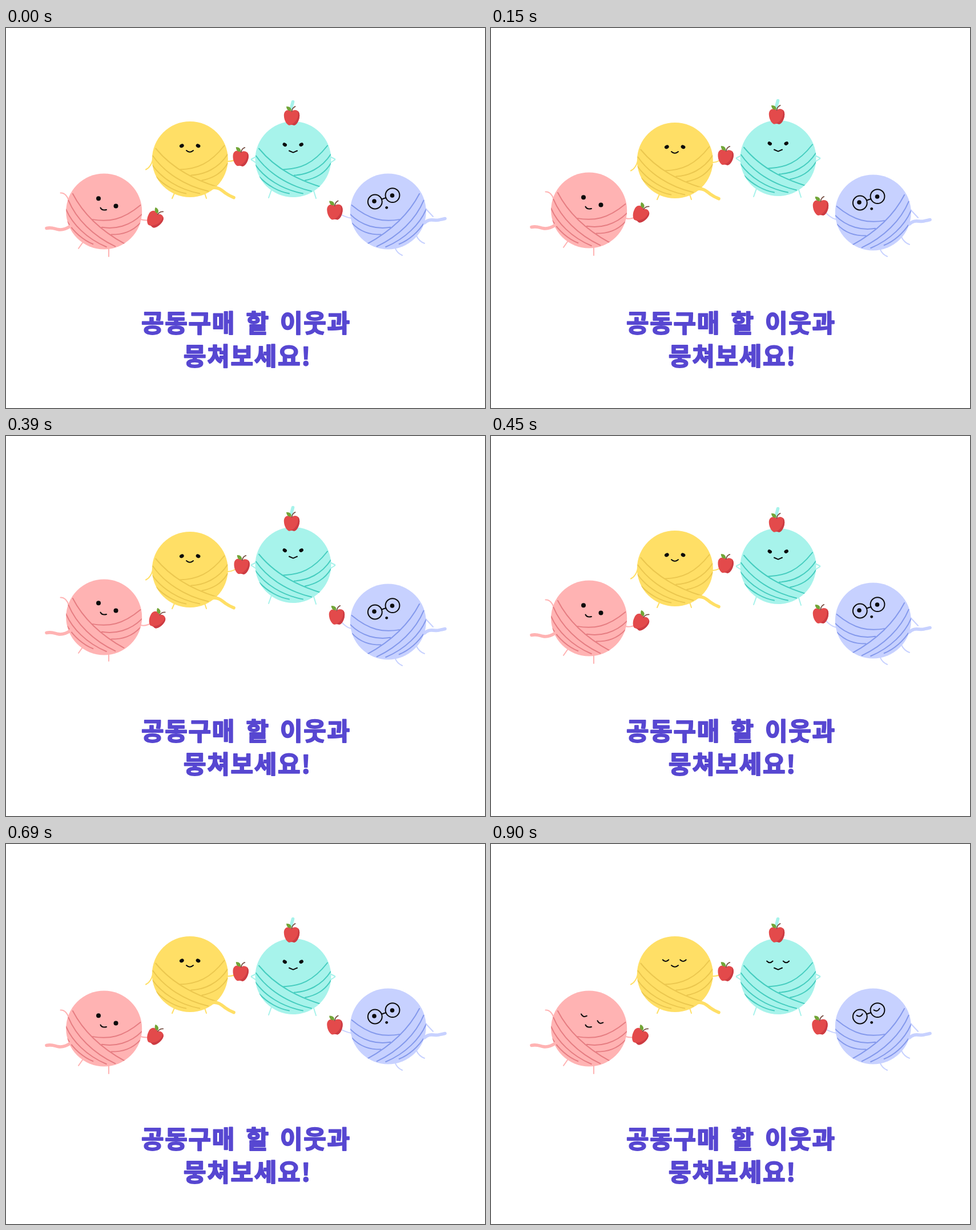
Animation of 839x667 px, one loop 1050 ms. Source, as an HTML page:

```html
<!DOCTYPE html>
<html lang="ko">
<head>
<meta charset="utf-8">
<title>공동구매</title>
<style>
  html, body { margin: 0; width: 100%; height: 100%; overflow: hidden; background: #fff; }
  svg { display: block; width: 100%; height: 100%; }
  .line { fill: none; stroke-width: 2; stroke-linecap: round; stroke-linejoin: round; }
  .tail { fill: none; stroke-width: 5.6; stroke-linecap: round; }
  .ink { fill: none; stroke: #0b0b0b; stroke-width: 2; stroke-linecap: round; stroke-linejoin: round; }
  .eye { fill: #0b0b0b; }
  text {
    font: 700 43px "Noto Sans CJK KR", "Noto Sans CJK", sans-serif;
    letter-spacing: 1.7px; word-spacing: 4.6px; fill: #5747d1;
    stroke: #5747d1; stroke-width: 2; stroke-linejoin: round;
  }
</style>
</head>
<body>
<svg viewBox="0 0 839 667">
  <defs>
    <clipPath id="round"><circle r="66.5"/></clipPath>
    <g id="yarn" clip-path="url(#round)">
      <path class="line" d="M-60 -19C-38 8 -5 32 47 48M-65 -6C-45 23 -10 46 32 56M-66 10C-50 33 -20 53 17 60M-59 31C-45 46 -25 57 -7 60
        M60 -24C35 8 12 17 -18 18M66 -9C50 16 25 27 2 28M66 7C55 25 40 33 21 37"/>
    </g>
    <g id="apple">
      <path fill="#e34a4b" d="M0 -9.500C5 -14 14 -12 13.700 -2C13.500 7 8 15 4 15Q0 13.500 -4 15C-8 15 -13.500 7 -13.700 -2C-14 -12 -5 -14 0 -9.500Z"/>
      <path fill="#cc3c43" d="M10.500 -10C12.800 -8.500 13.800 -5.500 13.700 -2C13.500 7 8 15 4 15Q1 14 -1 14C8 10 13 0 10.500 -10Z"/>
      <path fill="none" stroke="#7a5348" stroke-width="1.8" stroke-linecap="round" d="M0 -9.500Q1 -16 6 -18"/>
      <path fill="#72a538" d="M-1 -10.500C-6 -9.500 -9 -12.500 -9.500 -18C-4 -18.500 0 -15.500 -1 -10.500Z"/>
    </g>
  </defs>
  <g id="balls"></g>
  <text x="237" y="533.5">공동구매 할 이웃과</text>
  <text x="311" y="591.5">뭉쳐보세요!</text>
</svg>
<script>
const STEP = 150;
const SWAY = [0, 1, 2, 1, -1, -2, -1];

const ink = d => `<path class="ink" d="${d}"/>`;
const eye = (x, y, rx = 4, ry = 4, turn = 0) =>
  `<ellipse class="eye" rx="${rx}" ry="${ry}" transform="translate(${x} ${y}) rotate(${turn})"/>`;
const lid = (x, y, turn = 0) =>
  `<path class="ink" d="M-5.200 -1.500Q0 4 5.200 -1.500" transform="translate(${x} ${y}) rotate(${turn})"/>`;
const ring = (x, y) => `<circle class="ink" cx="${x}" cy="${y}" r="12.4"/>`;

// rise: direction of the bob; stretch: extra bob of all but the disc at the peak;
// apple: its centre for each arm pose
const balls = [
  {
    x: 171.7, y: 322, rise: -1, stretch: 1, fill: '#ffb3b3', line: '#e67d82', yarn: 'rotate(12)',
    limbs: 'M95.500 289.500C103 289 108 296 110 303M134 377L127 387M180 387V401',
    tail: 'M71 351.500C80 349.500 84 352 91 353.500S105 353 113 347.500',
    face: ink('M165.500 315.500Q168 321 176 319'),
    open: eye(162, 299.3) + eye(192.5, 312.5),
    shut: lid(162.5, 299.5, 18) + lid(191, 311.3, 18),
    apple: [[261, 335], [262.5, 328], [264.5, 326]], turn: 30, arm: [236, 336, 247, 339.5]
  },
  {
    x: 322.3, y: 230.5, rise: 1, stretch: 0, fill: '#ffdf66', line: '#ebc74f', yarn: '',
    limbs: 'M245 248.500C252 245 255 239 257 231M295 290L291 299M348 290L351 299',
    tail: 'M360 280.800C371 278 378 284.500 384 289.500Q391 294.500 399 297.700',
    face: ink('M316 215Q322 220.500 328 215'),
    open: eye(307.8, 206.8, 4, 3.2, -25) + eye(336.5, 206.8, 4, 3.2, 25),
    shut: lid(306, 206.8) + lid(336.5, 206.8),
    apple: [[411, 227.5], [411, 223.5], [413, 223.5]], turn: 4, arm: [387, 234, 396, 235]
  },
  {
    x: 503, y: 230.5, rise: -1, stretch: 0, fill: '#a7f3eb', line: '#45cdbf', yarn: '',
    limbs: 'M438 226L430 230Q429 231 431 232L437 236M568 226L576 230Q577 231 575 232L569 236M465 284L460 298M539 286L543 299',
    tail: 'M502.500 129.500L499.500 141',
    face: ink('M496 215.500L502 218.200Q503 218.700 504 218.200L510 215.500'),
    open: eye(488.3, 204.8, 3.9, 3, 30) + eye(517.2, 204.6, 3.9, 3, -30),
    shut: lid(488.3, 205) + lid(517, 205),
    apple: [[500.5, 155.8]], turn: 0
  },
  {
    x: 669.3, y: 322, rise: 1, stretch: 0, fill: '#c7d1ff', line: '#8499ec', yarn: 'scale(-1 1) rotate(12)',
    limbs: 'M735 317L748 331M682 387Q685 395 694 399M719 365Q724 375 733 378',
    tail: 'M733 342C742 333 750 339 758 337Q763 336 769 334.500',
    face: ring(646.3, 305) + ring(677, 293.6) + ink('M658 300.500L665.500 298') + eye(666.7, 315.3, 2.4, 2.4),
    open: eye(645, 304, 3.8, 3.8) + eye(676.5, 294, 3.8, 3.8),
    shut: lid(646, 303, -15) + lid(676, 293.5, -15),
    apple: [[576, 321.5], [577.5, 312], [579.5, 312]], turn: -1, arm: [605, 334, 593, 332]
  }
];

const draw = b => `<g>
  <path class="line limbs" stroke="${b.fill}" d="${b.limbs}"/>
  <path class="line arm" stroke="${b.fill}"/>
  <circle cx="${b.x}" cy="${b.y}" r="66.5" fill="${b.fill}"/>
  <g class="front">
    <use href="#yarn" stroke="${b.line}" transform="translate(${b.x} ${b.y}) ${b.yarn}"/>
    <path class="tail" stroke="${b.fill}" d="${b.tail}"/>
    ${b.face}
    <g class="open">${b.open}</g>
    <g class="shut">${b.shut}</g>
  </g>
  <use class="fruit" href="#apple"/>
</g>`;

const stage = document.getElementById('balls');
stage.innerHTML = balls.map(draw).join('');
balls.forEach((b, i) => {
  b.el = stage.children[i];
  for (const part of ['limbs', 'arm', 'front', 'open', 'shut', 'fruit']) b[part + 'El'] = b.el.querySelector('.' + part);
});

const shift = (el, dy) => el.setAttribute('transform', `translate(0 ${dy})`);
const show = (el, on) => el.setAttribute('visibility', on ? 'visible' : 'hidden');

function render(ms) {
  const step = Math.floor(ms / STEP) % SWAY.length;
  const sway = SWAY[step];
  const pose = Math.max(0, sway);
  const blink = step === SWAY.length - 1;
  for (const b of balls) {
    const [ax, ay] = b.apple[pose] || b.apple[0];
    const extra = 2 * b.rise * b.stretch * Math.max(0, pose - 1);
    shift(b.el, 2 * sway * b.rise);
    shift(b.limbsEl, extra);
    shift(b.frontEl, extra);
    b.fruitEl.setAttribute('transform', `translate(${ax} ${ay}) rotate(${b.turn})`);
    if (b.arm) {
      const [sx, sy, mx, my] = b.arm;
      b.armEl.setAttribute('d', `M${sx} ${sy}Q${mx} ${my} ${ax} ${ay}`);
    }
    show(b.openEl, !blink);
    show(b.shutEl, blink);
  }
}

const start = performance.now();
function tick() {
  render(performance.now() - start);
  requestAnimationFrame(tick);
}
tick();
</script>
</body>
</html>
```
